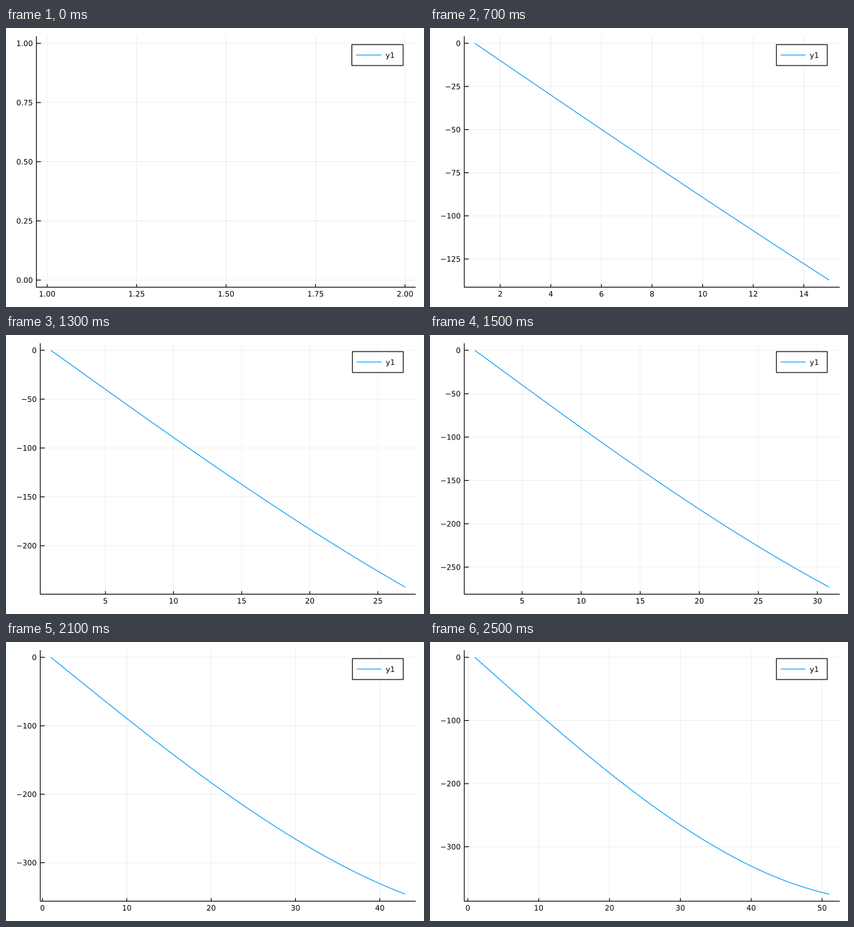
A matplotlib script for the animation above (2550 ms loop, 600 by 400 pixels).

```python
import math

import matplotlib.pyplot as plt
import numpy as np
from matplotlib.animation import FuncAnimation
from matplotlib.lines import Line2D
from matplotlib.patches import PathPatch, Rectangle
from matplotlib.textpath import TextPath
from matplotlib.transforms import Affine2D

W, H, DPI = 600, 400, 100
FRAMES, INTERVAL = 51, 50
TOP, RIGHT, BOTTOM = 11.81, 588.19, 371.6
LABEL_LEFT, LABEL_GAP = 14.8, 5.1
EM = 10.67
PAD = 0.03
BLUE = "#009AFA"
STROKE = 1.1

# Advance widths in em
ADVANCE = {".": 0.318, "\u2212": 0.838, "y": 0.592}
NICE_STEPS = [(1, 1.0), (5, 0.9), (2, 0.7), (2.5, 0.5), (3, 0.2)]

fig = plt.figure(figsize=(W / DPI, H / DPI), dpi=DPI, facecolor="white")
ax = fig.add_axes([0, 0, 1, 1])
ax.set_xlim(0, W)
ax.set_ylim(H, 0)
ax.axis("off")

xs = np.arange(0, FRAMES) / 10
values = xs**3 - 100 * xs


def text_width(s):
    return EM * sum(ADVANCE.get(c, 0.636) for c in s)


def put_text(s, x, baseline):
    path = TextPath((0, 0), s, size=EM, prop={"family": "DejaVu Sans"})
    place = Affine2D().scale(1, -1).translate(x, baseline)
    ax.add_patch(PathPatch(place.transform_path(path), fc="black", lw=0,
                           zorder=6, snap=False))


def stroke(x, y, color="black", px=STROKE, z=3, alpha=1):
    ax.add_line(Line2D(x, y, color=color, lw=px * 72 / DPI, alpha=alpha,
                       zorder=z, snap=False, solid_capstyle="butt",
                       solid_joinstyle="miter"))


def find_ticks(lo, hi, k_min=4, k_max=8, k_ideal=5):
    """Score candidate tick sets by count, zero, coverage and niceness."""
    span = hi - lo
    z = math.ceil(math.log10(span))
    best, high = [], -math.inf
    while 2 * k_max * 10.0 ** (z + 1) > span:
        for k in range(k_min, 2 * k_max + 1):
            for q, nice in NICE_STEPS:
                step = q * 10.0**z
                reach = (k - 1) * step
                if not span <= reach < 2 * span:
                    continue
                r = math.ceil((hi - reach) / step)
                while r * step <= lo:
                    ticks = [(r + i) * step for i in range(k)]
                    ticks = [t for t in ticks if lo <= t <= hi]
                    n = len(ticks)
                    if k_min <= n <= k_max:
                        score = (1 - abs(n - k_ideal) / k_ideal) / 4
                        score += (r <= 0 and -r < k) / 6
                        score += 0.5 * span / ((n - 1) * step) + nice / 4
                        if score > high + 1e-9:
                            best, high = ticks, score
                    r += 1
        z -= 1
    return best


def format_ticks(ticks):
    digits = 0
    while any(abs(round(t, digits) - t) > 1e-9 for t in ticks):
        digits += 1
    return [f"{t:.{digits}f}".replace("-", "\u2212") for t in ticks]


def widen(lo, hi):
    if lo == hi:
        hi = lo + 1
    pad = PAD * (hi - lo)
    return lo - pad, hi + pad


def draw_legend(left):
    width = RIGHT - left
    unit = width / 45
    box_right = RIGHT - width / 30
    box_top = TOP + (BOTTOM - TOP) / 30
    text_x = box_right - unit - text_width("y1")
    box_left = text_x - 4 * unit
    height = 30
    ax.add_patch(Rectangle((box_left, box_top), box_right - box_left, height,
                           fc="white", ec="black", lw=STROKE * 72 / DPI,
                           zorder=4, snap=False))
    mid = box_top + height / 2
    stroke([text_x - 3.5 * unit, text_x - 0.5 * unit], [mid, mid], BLUE, z=5)
    put_text("y1", text_x, mid + 4)


def draw(frame):
    for artist in list(ax.lines) + list(ax.patches):
        artist.remove()

    n = frame + 1
    y = values[:n]
    x_lo, x_hi = widen(1, n)
    y_lo, y_hi = widen(y.min(), y.max())
    x_ticks, y_ticks = find_ticks(x_lo, x_hi), find_ticks(y_lo, y_hi)
    x_labels, y_labels = format_ticks(x_ticks), format_ticks(y_ticks)

    label_right = LABEL_LEFT + max(map(text_width, y_labels))
    left = label_right + LABEL_GAP

    def px(v):
        return left + (v - x_lo) / (x_hi - x_lo) * (RIGHT - left)

    def py(v):
        return BOTTOM - (v - y_lo) / (y_hi - y_lo) * (BOTTOM - TOP)

    tick_h = 0.012 * (BOTTOM - TOP)
    tick_w = 0.012 * (RIGHT - left)
    for t, label in zip(x_ticks, x_labels):
        x = px(t)
        stroke([x, x], [TOP, BOTTOM], px=0.6, z=1, alpha=0.1)
        stroke([x, x], [BOTTOM, BOTTOM - tick_h])
        put_text(label, x - text_width(label) / 2, 385)
    for t, label in zip(y_ticks, y_labels):
        v = py(t)
        stroke([left, RIGHT], [v, v], px=0.6, z=1, alpha=0.1)
        stroke([left, left + tick_w], [v, v])
        put_text(label, label_right - text_width(label), v + 3.9)

    stroke([left, left, RIGHT], [TOP, BOTTOM, BOTTOM])
    if n > 1:
        stroke(px(np.arange(1, n + 1)), py(y), BLUE)
    draw_legend(left)
    return []


anim = FuncAnimation(fig, draw, frames=FRAMES, interval=INTERVAL,
                     init_func=lambda: draw(0), repeat=True, repeat_delay=0,
                     cache_frame_data=False)
plt.show()
```
